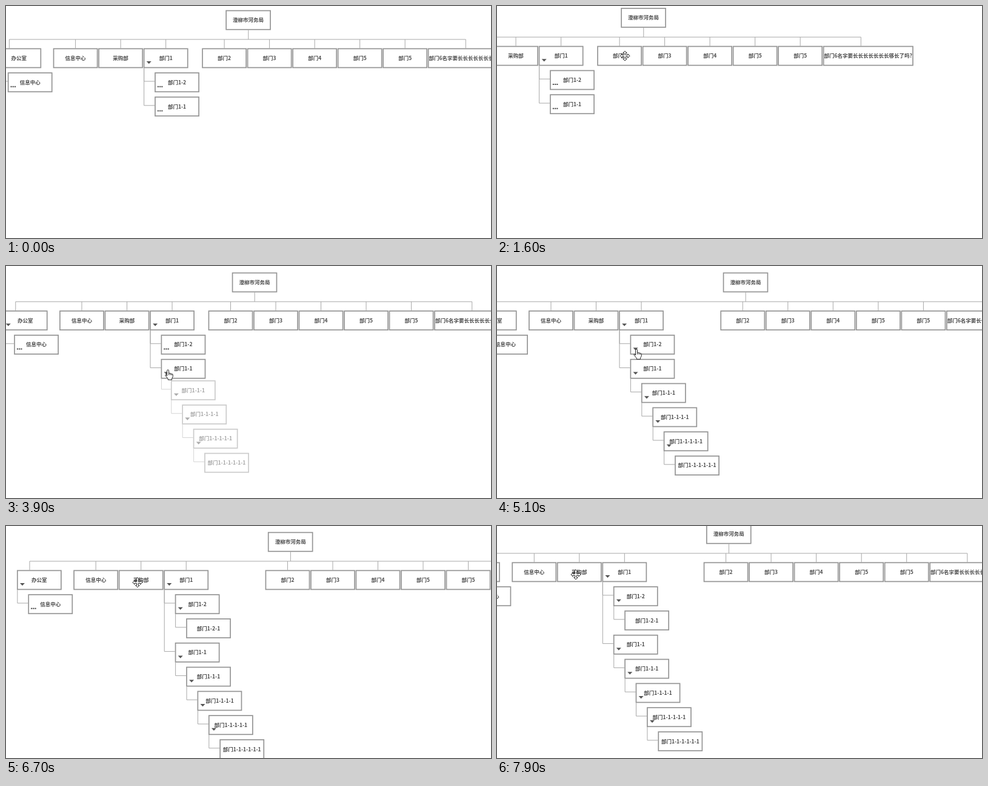
These frames come from a looping animation (800 by 382 pixels, 8000 ms). An HTML page:

```html
<!DOCTYPE html>
<html lang="zh-CN">
<head>
<meta charset="utf-8">
<title>Org chart</title>
<style>
  html, body { margin: 0; width: 100%; height: 100%; overflow: hidden; background: #fff; }
  svg { display: block; width: 800px; height: 382px; }
  text { font: 600 8.5px "Noto Sans CJK SC", "Noto Sans CJK", "Noto Sans", sans-serif; fill: #4a4a4a; text-anchor: middle; }
  .box { fill: #fff; stroke: #959595; stroke-width: 1.7; }
  .link { fill: none; stroke: #a8a8a8; stroke-width: 1; }
  .mark { fill: #555; }
  .cursor { fill: #fff; stroke: #222; stroke-width: 1; stroke-linejoin: round; }
</style>
</head>
<body>
<svg viewBox="0 0 800 382"><g id="chart"></g><g id="pointer" class="cursor"></g></svg>
<script>
const LOOP = 8000, TICK = 100;
const W = 73.8, H = 32.8, PITCH = 74.52, INDENT = 18.4, ROW = 39.8;
const ROOT = { x: 362.3, y: 6.8 }, TOP = 69.5, BAR = 55;
const OPEN_FIRST = 3700, SPREAD = 4000, OPEN_SECOND = 5100;

// Pointer legs; a drag leg moves the chart along. kx and ky are easing powers.
const LEGS = [
  { from: 200, to: 700, x: 369, y: 86 },
  { from: 800, to: 1600, x: 211, y: 82.2, drag: true },
  { from: 1800, to: 1900, x: 243, y: 82.2 },
  { from: 1800, to: 2500, x: 411.4, y: 89.8, drag: true, kx: 1.1, ky: 0.35 },
  { from: 2400, to: 2500, x: 391, y: 89 },
  { from: 3000, to: 3700, x: 269, y: 179, hand: true },
  { from: 4300, to: 5100, x: 232, y: 145, hand: true },
  { from: 5700, to: 5800, x: 207, y: 144 },
  { from: 5900, to: 6100, x: 157.7, y: 93.8 },
  { from: 6100, to: 7000, x: 278, y: 90, drag: true, kx: 1.75, ky: 3.85 },
  { from: 7100, to: 7900, x: 130, y: 80, drag: true }
];

const chart = document.getElementById('chart');
const pointer = document.getElementById('pointer');

const progress = (t, from, to) => Math.min(1, Math.max(0, (t - from) / (to - from)));
const easeOut = u => 1 - (1 - u) ** 2;

function track(t) {
  const s = { x: 365, y: 303, panX: 0, panY: 0, hand: false };
  for (const { from, to, x, y, drag, hand, kx = 1, ky = 1 } of LEGS) {
    if (t <= from) break;
    const u = progress(t, from, to);
    const dx = (x - s.x) * u ** kx, dy = (y - s.y) * u ** ky;
    s.x += dx;
    s.y += dy;
    if (drag) {
      s.panX += dx;
      s.panY += dy;
    }
    s.hand = !!hand && t >= to - TICK;
  }
  return s;
}

const link = d => `<path class="link" d="${d}"/>`;

function mark(kind, x, y) {
  if (kind === 'open') return `<path class="mark" d="M${x - 4} ${y - 2}h8l-4 4.3z"/>`;
  if (kind === 'more') return [-3.2, 0, 3.2].map(d =>
    `<rect class="mark" x="${x + d - 1.1}" y="${y - 1}" width="2.2" height="2"/>`).join('');
  return '';
}

function box(label, x, y, kind, w = W) {
  return `<rect class="box" x="${x + 0.85}" y="${y + 0.85}" width="${w - 1.7}" height="${H - 1.7}"/>` +
    mark(kind, x + 9, y + 23.5) +
    `<text x="${x + w / 2}" y="${y + H / 2 + 3}">${label}</text>`;
}

// a box joined by an elbow to its parent's lower left corner
function child(label, px, py, x, y, kind) {
  return link(`M${px + 0.9} ${py + H}V${y + 14.7}H${x}`) + box(label, x, y, kind);
}

const fade = (u, body) => `<g opacity="${u ** 1.8}">${body}</g>`;

// descendants of 部门1-1, sliding out from under it
function chain(x, y, u) {
  const lag = 1 - easeOut(u);
  let out = '', px = x, py = y;
  for (let n = 1; n <= 4; n++) {
    const cx = x + INDENT * (n - lag), cy = y + ROW * (n - lag);
    out += child('部门1-1' + '-1'.repeat(n), px, py, cx, cy, n < 4 ? 'open' : '');
    px = cx;
    py = cy;
  }
  return fade(u, out);
}

function drawChart(t) {
  const wide = t >= SPREAD;
  const left = n => 77.7 + n * PITCH - (wide ? 36 : 0);
  const right = n => 323.2 + n * PITCH + (wide ? 34.8 : 0);
  const first = progress(t, OPEN_FIRST, SPREAD);
  const second = progress(t, OPEN_SECOND, OPEN_SECOND + 200);
  const grow = easeOut(second);

  const office = left(0) - 93.3, dept = left(2), sub = dept + INDENT;
  const y2 = TOP + ROW, y1 = y2 + ROW * (1 + grow);

  const start = office + 21, end = right(5) + 62.5;
  const stub = x => `M${x} ${BAR}V${TOP}`;
  let lines = `M${ROOT.x + W / 2 + 0.6} ${ROOT.y + H}V${BAR}M${start} ${BAR}H${end}` + stub(start) + stub(end);
  let boxes = '';
  const top = (label, x, kind) => {
    lines += stub(x + W / 2);
    boxes += box(label, x, TOP, kind);
  };
  ['信息中心', '采购部'].forEach((label, n) => top(label, left(n)));
  top('部门1', dept, 'open');
  for (let n = 0; n < 5; n++) top('部门' + Math.min(n + 2, 5), right(n));

  let out = link(lines) + boxes;
  out += box('澄柳市河务局', ROOT.x, ROOT.y, '', W + 0.8);
  out += box('办公室', office, TOP, 'open');
  out += child('信息中心', office, TOP, office + INDENT, y2, 'more');
  out += box('部门6名字要' + '长'.repeat(7) + '够长了吗?', right(5), TOP, '', 149);
  out += child('部门1-1', dept, TOP, sub, y1, t >= OPEN_FIRST ? 'open' : 'more');
  out += child('部门1-2', dept, TOP, sub, y2, t >= OPEN_SECOND ? 'open' : 'more');
  if (second) out += fade(second, child('部门1-2-1', sub, y2, sub + INDENT * grow, y2 + ROW * grow));
  if (first) out += chain(sub, y1, first);
  return out;
}

const HAND = '<path d="M-3.4 2V-6.5a1.5 1.5 0 0 1 3 0V-2.2q1.4-.9 2.4.4q1.5-.7 2.2.6q1.8-.4 2 1.2V3.5' +
  'L4.6 6.2V8.4H-1.8V6.6L-6 1.6q-.6-1.9 1-1.6z"/><path d="M-.4-2v2.6M2-1.6v2.2M4.2-1v1.8"/>';
const MOVE = '<path d="M0-8L3.3-4.8H1.3V-1.3H4.8V-3.3L8 0L4.8 3.3V1.3H1.3V4.8H3.3L0 8' +
  'L-3.3 4.8H-1.3V1.3H-4.8V3.3L-8 0L-4.8-3.3V-1.3H-1.3V-4.8H-3.3z"/>';

let last = -1;
function render(t) {
  if (t === last) return;
  last = t;
  const s = track(t);
  chart.innerHTML = drawChart(t);
  chart.setAttribute('transform', `translate(${s.panX} ${s.panY})`);
  pointer.innerHTML = t < 200 ? '' : s.hand ? HAND : MOVE;
  pointer.setAttribute('transform', `translate(${s.x} ${s.y})`);
}

const begin = performance.now();
function loop() {
  const t = (performance.now() - begin) % LOOP;
  render(Math.floor(t / TICK) * TICK);
  requestAnimationFrame(loop);
}
loop();
</script>
</body>
</html>
```
